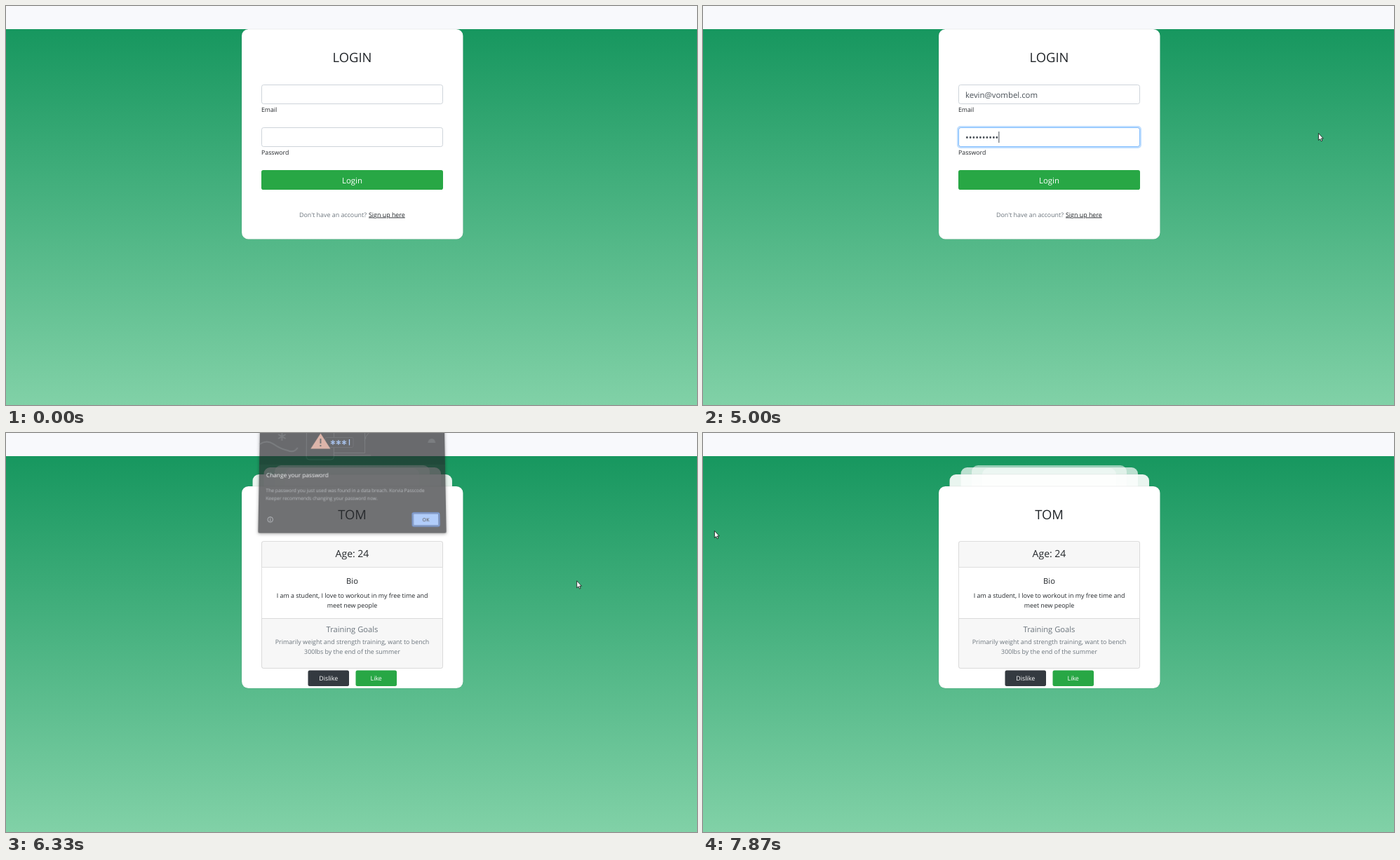
An HTML page that plays this animation: 985x569 px, repeating every 8 s.

```html
<!DOCTYPE html>
<html lang="en">
<head>
<meta charset="utf-8">
<title>Login</title>
<style>
  html, body { margin: 0; height: 100%; overflow: hidden; }
  body { position: relative; background: linear-gradient(#f8f9fc 33px, #17975f 33px, #81d1a7); }
  svg { position: absolute; left: 0; top: 0; width: 985px; height: 569px; }
  text { font: 8.9px "Open Sans", "Noto Sans", sans-serif; text-rendering: geometricPrecision; fill: #212529; }
  .mid text, text.mid { text-anchor: middle; }
  text.h { font-size: 18.4px; font-weight: 500; }
  text.h2 { font-size: 14px; font-weight: 500; }
  text.h3 { font-size: 11.2px; font-weight: 500; }
  text.label { font-size: 8.75px; }
  text.input { font-size: 11.4px; fill: #495057; }
  text.grey { fill: #6c757d; }
  text.light { fill: #fff; }
  .card { fill: #fff; stroke: #000; stroke-opacity: .1; stroke-width: .6; }
  .box { fill: #fff; stroke: #ced4da; }
  .line { fill: none; stroke: #000; stroke-opacity: .13; }
  #popup { overflow: visible; transform-origin: 493.5px 0; filter: drop-shadow(0 1px 2px #0008); }
  #popup text { fill: #e8eaed; font-size: 8.25px; }
  #popup .note { fill: #9aa0a6; font-size: 6.6px; }
  .art { fill: none; stroke: #3c4043; stroke-width: 2; }
</style>
</head>
<body>
<svg>
  <g id="login">
    <rect class="card" x="336" y="33" width="315.5" height="299.5" rx="9.5"/>
    <text class="h mid" x="493.5" y="80.3">LOGIN</text>
    <rect class="box" x="364.5" y="112.5" width="258" height="27" rx="2.8"/>
    <rect class="box" x="364.5" y="173.5" width="258" height="27" rx="2.8"/>
    <g id="ring1" fill="none">
      <rect x="363" y="111" width="261" height="30" rx="4" stroke="#bfdeff" stroke-width="2"/>
      <rect x="364.5" y="112.5" width="258" height="27" rx="2.8" stroke="#80bdff"/>
    </g>
    <use id="ring2" href="#ring1" y="61"/>
    <text id="email" class="input" x="374" y="131"></text>
    <text id="dots" class="input" x="374" y="191.5" style="font-size:12.6px"></text>
    <rect id="caret" width="1" height="16" fill="#495057"/>
    <text class="label" x="364" y="150.5">Email</text>
    <text class="label" x="364" y="211.5">Password</text>
    <rect x="364" y="234" width="259" height="28" rx="2.8" fill="#28a745"/>
    <text class="input light mid" x="493.5" y="252.5" style="fill:#fff">Login</text>
    <text class="grey" x="418" y="300.5">Don't have an account?</text>
    <text x="517" y="300.5" text-decoration="underline">Sign up here</text>
  </g>
  <g id="profile" class="mid">
    <g class="card">
      <rect x="398" y="50" width="191" height="200" rx="9" opacity=".4"/>
      <rect x="383" y="46" width="221" height="220" rx="9" opacity=".55"/>
      <rect x="367.5" y="49" width="252.5" height="250" rx="9" opacity=".7"/>
      <rect x="351.5" y="59" width="284.5" height="280" rx="9" opacity=".9"/>
      <rect x="336" y="76" width="315.5" height="288" rx="9.5"/>
    </g>
    <text class="h" x="493.5" y="123">TOM</text>
    <path d="M364.5 155h258v36h-258zM364.5 264.5h258v71h-258z" fill="#f7f7f7"/>
    <rect class="line" x="364.5" y="154.5" width="258" height="181" rx="2.5"/>
    <path class="line" d="M365 191.5h257M365 264.5h257"/>
    <text class="h2" x="493.5" y="176.5">Age: 24</text>
    <text class="h3" x="493.5" y="215">Bio</text>
    <text x="493.5" y="235">I am a student, I love to workout in my free time and</text>
    <text x="493.5" y="249">meet new people</text>
    <text class="h3 grey" x="493.5" y="284">Training Goals</text>
    <text class="grey" x="493.5" y="301.3">Primarily weight and strength training, want to bench</text>
    <text class="grey" x="493.5" y="315.3">300lbs by the end of the summer</text>
    <rect x="430.5" y="338.5" width="58.5" height="22.5" rx="2.5" fill="#343a40"/>
    <rect x="498.5" y="338.5" width="58.5" height="22.5" rx="2.5" fill="#28a745"/>
    <text class="light" x="459.7" y="353.3">Dislike</text>
    <text class="light" x="527.7" y="353.3">Like</text>
  </g>
</svg>

<svg id="popup">
  <rect x="362" y="-30" width="263" height="176" rx="2" fill="#292a2d"/>
  <path d="M362-30h263v80h-263z" fill="#222326"/>
  <path class="art" d="M362 21q10-7 20 0t20 9q9 4 14-4M393.500 4v12M388.300 7l10.400 6M398.700 7l-10.400 6"/>
  <path class="art" stroke-width="1" style="stroke-width:1" d="M428.500-5v44q0 4 4 4h31q4 0 4-4v-44M468 33.500h43.500v-38M468 37h52M511 16q3-13 16-16h12"/>
  <path d="M601 19q1-6 6-6 4 0 5 6z" fill="#3c4043"/>
  <rect x="455" y="11.500" width="40" height="14" rx="2" fill="#202124" stroke="#34363a"/>
  <path d="M448.500 5.500l14 22h-28z" fill="#cf9481"/>
  <path d="M448.500 13v7M448.500 22v2.200" stroke="#292a2d" stroke-width="1.800"/>
  <path id="stars" stroke="#8ab4f8" stroke-width="1.300" d="M466 15v7M463 16.800l6 3.400M469 16.800l-6 3.400M474 15v7M471 16.800l6 3.400M477 16.800l-6 3.400M482 15v7M479 16.800l6 3.400M485 16.800l-6 3.400M489.500 14v8.500"/>
  <text x="372" y="68">Change your password</text>
  <text class="note" x="372" y="88.500">The password you just used was found in a data breach. Korvia Passcode</text>
  <text class="note" x="372" y="100.300">Keeper recommends changing your password now.</text>
  <circle cx="378.800" cy="127.300" r="3.700" fill="none" stroke="#9aa0a6" stroke-width=".9"/>
  <path d="M378.800 126.500v3M378.800 124.700v1" stroke="#9aa0a6"/>
  <rect x="578" y="118" width="37.500" height="18.500" rx="2" fill="#8ab4f8" stroke="#3f73d0" stroke-width="1.600"/>
  <rect x="579" y="119" width="35.500" height="16.500" rx="1" fill="none" stroke="#24355a" stroke-width=".7"/>
  <text class="mid" x="596.700" y="129.700" style="fill:#202124;font-size:6.800px;font-weight:600">OK</text>
</svg>

<svg>
  <g id="cursor">
    <path id="arrow" d="M.4.5v10l2.300-2 1.500 3.300 1.600-.7-1.500-3.200h2.900z" fill="#fff" stroke="#111" stroke-width=".8"/>
    <path id="beam" d="M-2-5h4M0-5v10M-2 5h4" stroke="#222" stroke-width=".9"/>
  </g>
</svg>

<script>
const $ = id => document.getElementById(id);
const LOOP = 8000, BLANK = 5800, PROFILE = 6000, CLICK = 940, TAB = 3640;
const address = "kevin@vombel.com";
const emailKeys = [1800, 1870, 1930, 2070, 2130, 2330, 2530, 2670, 2870, 2930, 3130, 3200, 3330, 3400, 3470, 3530];
const passKeys = [3930, 4000, 4070, 4130, 4330, 4400, 4600, 4800, 4930, 5000, 5200];
// Pointer stops: time, x, y
const path = [
  [130, 846, 421], [860, 440, 126], [990, 440, 126], [1200, 877, 181], [6000, 877, 181],
  [6530, 775, 228], [6700, 775, 228], [7150, 589, 118], [7540, 589, 118], [7860, 16, 139]
];

const ramp = (t, from, length) => Math.min(1, Math.max(0, (t - from) / length));
const smooth = p => p * p * (3 - 2 * p);
const typed = (keys, t) => keys.filter(k => k <= t).length;
const show = (id, on) => $(id).style.display = on ? "" : "none";

function pointerAt(t) {
  const i = path.findIndex(p => p[0] > t);
  if (i < 0) return path.at(-1).slice(1);
  const [a, b] = [path[Math.max(0, i - 1)], path[i]];
  const p = ramp(t, a[0], b[0] - a[0]);
  return [a[1] + (b[1] - a[1]) * p, a[2] + (b[2] - a[2]) * p];
}

function drawLogin(t) {
  const focus = smooth(ramp(t, CLICK - 20, 150)), moved = smooth(ramp(t, TAB, 150));
  $("ring1").style.opacity = 1;
  for (const part of $("ring1").children) part.style.opacity = "inherit";
  $("ring1").style.opacity = focus * (1 - moved);
  $("email").textContent = address.slice(0, typed(emailKeys, t));
  $("dots").textContent = "•".repeat(typed(passKeys, t));
  const second = t >= TAB, field = $(second ? "dots" : "email");
  $("caret").setAttribute("x", 374 + field.getComputedTextLength());
  $("caret").setAttribute("y", second ? 179 : 118);
  show("caret", t >= CLICK && !(t >= 1470 && t < emailKeys[0]));
  $("ring2").style.opacity = moved;
}

function drawPopup(t) {
  const k = (1 - (1 - ramp(t, 6250, 260)) ** 3) * (1 - ramp(t, 7420, 180));
  show("popup", k > 0);
  $("popup").style.opacity = k;
  $("popup").style.transform =
    `translateY(${-15 * (1 - k)}px) perspective(1000px) rotateX(${24.5 * (1 - k)}deg)`;
}

function drawPointer(t) {
  const [x, y] = pointerAt(t);
  const overField = t < BLANK && x > 364 && x < 623 && (y > 112 && y < 140 || y > 173 && y < 201);
  show("cursor", t >= path[0][0]);
  show("beam", overField);
  show("arrow", !overField);
  $("cursor").setAttribute("transform", `translate(${x} ${y})`);
}

// The second ring is an independent copy, so each field fades on its own.
const ring2 = $("ring1").cloneNode(true);
ring2.id = "ring2";
ring2.setAttribute("transform", "translate(0 61)");
$("ring2").replaceWith(ring2);

const start = performance.now();
function frame(now) {
  const t = Math.max(0, now - start) % LOOP;
  show("login", t < BLANK);
  show("profile", t >= PROFILE);
  if (t < BLANK) drawLogin(t);
  drawPopup(t);
  drawPointer(t);
  requestAnimationFrame(frame);
}
requestAnimationFrame(frame);
</script>
</body>
</html>
```
